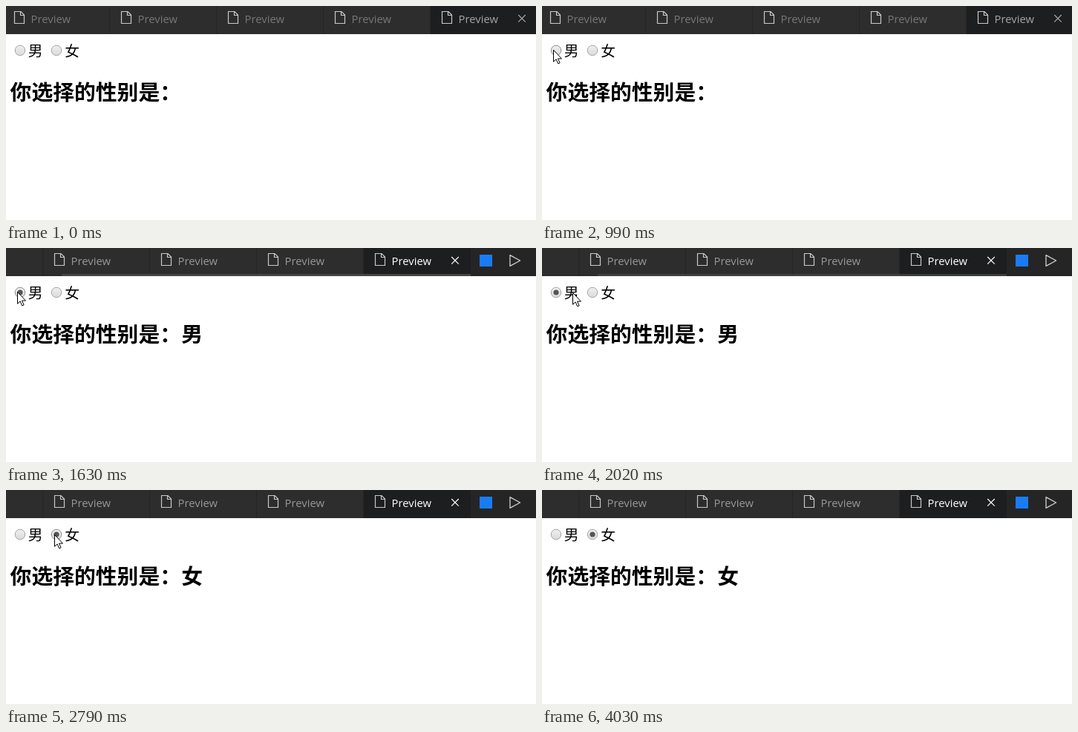
These frames come from a looping animation (714x289 px, 4660 ms). An HTML page:

```html
<!DOCTYPE html>
<html lang="zh-CN">
<head>
<meta charset="utf-8">
<title>Radio demo</title>
<style>
html, body { margin: 0; width: 100%; height: 100%; overflow: hidden; background: #fff; }
svg { display: block; width: 714px; height: 289px; }
.strip { font: 14.8px "Open Sans", "Noto Sans", sans-serif; }
.label { font: 300 19.8px "Noto Sans CJK SC", "Noto Sans CJK", sans-serif; }
.head { font: bold 28.8px "Noto Sans CJK SC", "Noto Sans CJK", sans-serif; }

/* every part shares one 4660 ms clock and changes in hard steps */
.strip, .idle, .active, .tools, .bar, .cursor, .male, .female, .ring1, .ring2 {
  animation: 4660ms step-end infinite;
}
.strip { animation-name: shift; }
.idle { animation-name: idle; }
.active { animation-name: active; }
.tools { animation-name: tools; }
.bar { animation-name: bar; animation-timing-function: linear; }
.cursor { animation-name: cursor; }
.male { animation-name: male; }
.female { animation-name: female; }
.ring1 { animation-name: ring1; }
.ring2 { animation-name: ring2; }

@keyframes shift { 0% { transform: none; } 31.33%, 100% { transform: translateX(-90px); } }
@keyframes idle { 0% { color: #777; } 31.33%, 100% { color: #979797; } }
@keyframes active { 0% { color: #a6a6a6; } 31.33%, 100% { color: #fff; } }
@keyframes tools { 0% { visibility: hidden; } 31.33%, 100% { visibility: visible; } }
@keyframes bar {
  0%, 31.3% { opacity: 0; }
  33.3%, 37% { opacity: 1; }
  50% { opacity: .55; }
  58%, 100% { opacity: 0; }
}
@keyframes male {
  0% { visibility: hidden; }
  30.04% { visibility: visible; }
  59.87%, 100% { visibility: hidden; }
}
@keyframes female { 0% { visibility: hidden; } 59.87%, 100% { visibility: visible; } }
@keyframes ring1 {
  0% { stroke: #a3a3a3; fill: url(#face); }
  21.24% { stroke: #8c8c8c; fill: url(#face); }
  26.39% { stroke: #8c8c8c; fill: url(#press); }
  30.04% { stroke: #8c8c8c; fill: url(#face); }
  41.41%, 100% { stroke: #a3a3a3; fill: url(#face); }
}
@keyframes ring2 {
  0% { stroke: #a3a3a3; fill: url(#face); }
  48.28% { stroke: #949494; fill: url(#face); }
  58.15% { stroke: #8c8c8c; fill: url(#press); }
  59.87% { stroke: #8c8c8c; fill: url(#face); }
  79.82%, 100% { stroke: #a3a3a3; fill: url(#face); }
}
@keyframes cursor {
  0% { transform: translate(-40px, 0); }
  6.43% { transform: translate(521px, 274px); }
  8.15% { transform: translate(327px, 222px); }
  9.87% { transform: translate(142px, 158px); }
  11.37% { transform: translate(16px, 96px); }
  13.09% { transform: translate(-40px, 70px); }
  16.3% { transform: translate(2px, 58px); }
  18.02% { transform: translate(9px, 58px); }
  19.52% { transform: translate(13px, 59px); }
  21.24% { transform: translate(15px, 59px); }
  37.98% { transform: translate(17px, 59px); }
  39.69% { transform: translate(22px, 59px); }
  41.41% { transform: translate(31px, 60px); }
  43.13% { transform: translate(41px, 60px); }
  44.84% { transform: translate(50px, 60px); }
  46.56% { transform: translate(57px, 60px); }
  48.28% { transform: translate(61px, 60px); }
  50% { transform: translate(62px, 60px); }
  51.71% { transform: translate(64px, 60px); }
  54.93% { transform: translate(65px, 60px); }
  79.82% { transform: translate(80px, 74px); }
  81.54% { transform: translate(146px, 128px); }
  83.04% { transform: translate(244px, 206px); }
  84.76% { transform: translate(332px, 275px); }
  86.48%, 100% { transform: translate(-40px, 0); }
}
</style>
</head>
<body>
<svg viewBox="0 0 714 289">
  <defs>
    <linearGradient id="face" x2="0" y2="1">
      <stop stop-color="#efefef"/><stop offset="1" stop-color="#dadada"/>
    </linearGradient>
    <linearGradient id="press" x2="0" y2="1">
      <stop stop-color="#ececec"/><stop offset="1" stop-color="#e6e6e6"/>
    </linearGradient>
    <g id="tab">
      <path d="M15.5 7.5h8.5l4.5 4.5v11.5h-13zM23.5 7.5v5h5" fill="none" stroke="#c8c8c8" stroke-width="1.2"/>
      <text x="37.6" y="22.5" fill="currentColor">Preview</text>
    </g>
    <g id="idle-tab">
      <rect width="143" height="38" fill="#2d2d2d"/>
      <use href="#tab"/>
    </g>
  </defs>

  <rect width="714" height="38" fill="#252526"/>
  <g class="strip">
    <g class="idle">
      <use href="#idle-tab" x="-4"/>
      <use href="#idle-tab" x="140"/>
      <use href="#idle-tab" x="284"/>
      <use href="#idle-tab" x="428"/>
    </g>
    <g class="active">
      <rect x="572" width="144" height="38" fill="#1d1e20"/>
      <use href="#tab" x="572"/>
      <path d="M690.2 12l9.6 9.6m0-9.6l-9.6 9.6" fill="none" stroke="currentColor" stroke-width="1.2"/>
    </g>
  </g>
  <rect class="bar" x="75" y="35" width="551" height="3" fill="#444"/>
  <g class="tools">
    <rect x="638" y="9" width="17" height="16" fill="#1a7cf5"/>
    <path d="M679 9.6v14.8l13.6-7.4z" fill="none" stroke="#d0d0d0" stroke-width="1.3" stroke-linejoin="round"/>
  </g>

  <circle class="ring1" cx="19" cy="60" r="6.8"/>
  <circle class="ring2" cx="68" cy="60" r="6.8"/>
  <circle class="male" cx="19" cy="60" r="3.6" fill="#555"/>
  <circle class="female" cx="68" cy="60" r="3.6" fill="#555"/>
  <text class="label" x="29.8" y="68">男</text>
  <text class="label" x="79.3" y="68">女</text>

  <text class="head" x="5.6" y="127">你选择的性别是：</text>
  <text class="head male" x="236.2" y="127">男</text>
  <text class="head female" x="236.2" y="127">女</text>

  <path class="cursor" d="M.5 .5v15.8l3.6-3.4 2.6 6 2.4-1-2.6-5.8h5z" fill="#fff" stroke="#000"/>
</svg>
</body>
</html>
```
